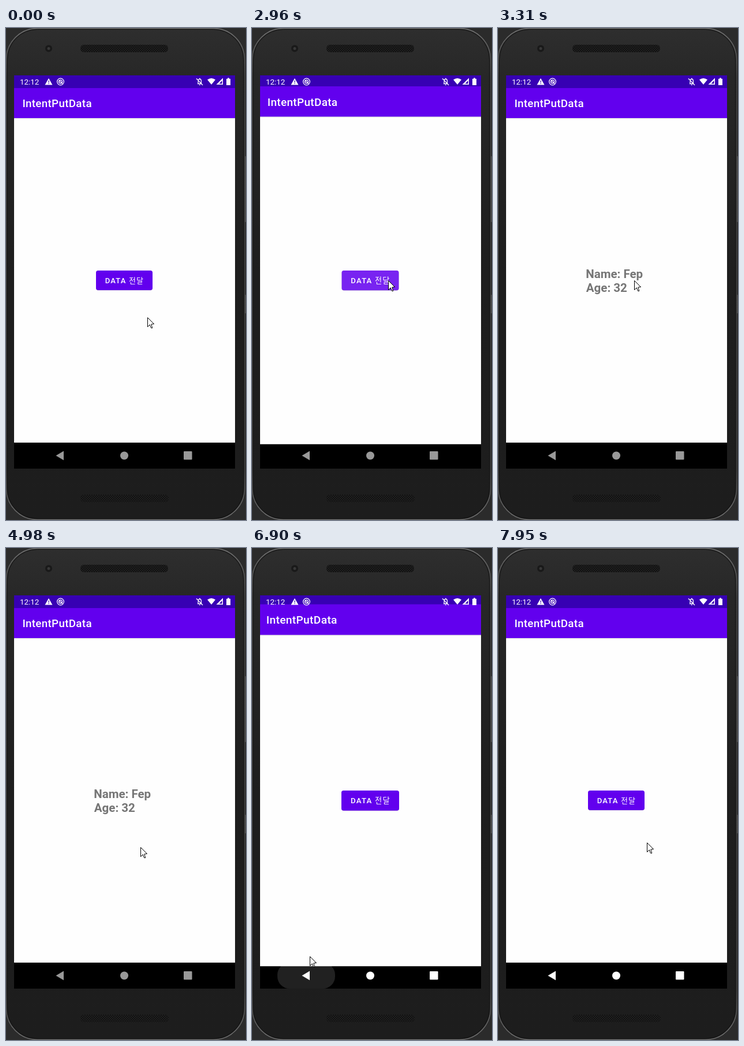
An HTML page for the animation above (8000 ms loop, 416x852 px).

```html
<!DOCTYPE html>
<html lang="ko">
<meta charset="utf-8">
<title>IntentPutData</title>
<style>
  html, body { margin: 0; width: 100%; height: 100%; overflow: hidden; background: #2b2b2b; }
  svg { display: block; width: 416px; height: 852px; font-family: Roboto, "Noto Sans CJK KR", sans-serif; }
  .title { font-size: 18.8px; font-weight: 500; letter-spacing: .32px; }
  .label { font-size: 13.05px; font-weight: 500; letter-spacing: 1.165px; }
  .label tspan { font-weight: 400; }
  .info { font-size: 20.5px; font-weight: 700; fill: #757575; }
</style>
<svg viewBox="0 0 416 852">
  <defs>
    <linearGradient id="shell" x2="0" y2="1">
      <stop stop-color="#2e2e2e"/><stop offset=".1" stop-color="#272727"/>
      <stop offset=".5" stop-color="#1e1e1e"/><stop offset="1" stop-color="#1d1d1d"/>
    </linearGradient>
    <linearGradient id="rim" x2="0" y2="1">
      <stop stop-color="#777"/><stop offset=".1" stop-color="#404040"/>
      <stop offset=".9" stop-color="#404040"/><stop offset="1" stop-color="#777"/>
    </linearGradient>
    <linearGradient id="shade" x2="0" y2="1">
      <stop stop-opacity=".15"/><stop offset="1" stop-opacity="0"/>
    </linearGradient>
    <pattern id="mesh" width="4" height="4" patternUnits="userSpaceOnUse">
      <rect width="4" height="4" fill="#202020"/>
      <circle cx="1" cy="1" r="1" fill="#0b0b0b"/><circle cx="3" cy="3" r="1" fill="#0b0b0b"/>
    </pattern>
    <clipPath id="screen"><path d="M14 82H397V763H14z"/></clipPath>
    <g id="window">
      <path fill="#fefefe" d="M14 82H397V763H14z"/>
      <path fill="#6200ee" d="M14 82H397V156H14z"/>
      <path fill="#3700b3" d="M14 82H397V104H14z"/>
      <path fill="url(#shade)" d="M14 156H397V158H14z"/>
      <path d="M14 718H397V763H14z"/>
      <text class="title" x="28.4" y="137.3" fill="#fff">IntentPutData</text>
    </g>
  </defs>

  <!-- device -->
  <path fill="#4a4a4a" d="M414 222h2v114h-2zM414 462h2v32h-2z"/>
  <rect x=".5" y=".5" width="413" height="851" rx="54" fill="url(#shell)" stroke="url(#rim)" stroke-width="1.5"/>
  <rect x="2.5" y="2.5" width="409" height="847" rx="52" fill="none" stroke="#151515"/>
  <rect x="129" y="29" width="152" height="13" rx="6" fill="url(#mesh)"/>
  <rect x="129" y="808" width="153" height="13" rx="6" fill="url(#mesh)"/>
  <circle cx="74" cy="35.5" r="6" fill="#191919"/>
  <circle cx="74" cy="35.5" r="2.5" fill="#383838"/>

  <g clip-path="url(#screen)">
    <g id="first">
      <use href="#window"/>
      <rect x="156" y="420.5" width="98" height="34" rx="4" opacity=".2"/>
      <rect x="156" y="420" width="98" height="34" rx="3.7" fill="#6200ee"/>
      <rect id="press" x="156" y="420" width="98" height="34" rx="3.7" fill="#fff"/>
      <text class="label" x="171.7" y="441.8" fill="#fff">DATA <tspan>전달</tspan></text>
    </g>
    <g id="second">
      <use href="#window"/>
      <text class="info" x="152.3" y="433">Name: Fep</text>
      <text class="info" x="152.8" y="457">Age: 32</text>
    </g>

    <!-- status bar -->
    <g fill="#fff">
      <text x="24" y="98" font-size="13.4">12:12</text>
      <path d="M74 87l6.5 11.5h-13z"/>
      <path d="M73.5 91h1.2v3.6h-1.2zM73.5 95.6h1.2v1.3h-1.2z" fill="#3700b3"/>
      <path d="M349 89.5q7-5 14 0l-7 8.5z"/>
      <path d="M376 86.5v11.5h-11.5z"/>
      <path d="M374.5 91v5.5h-5z" fill="#3700b3"/>
      <path d="M382 88h2v-1.5h3v1.5h2v11h-7z"/>
    </g>
    <g fill="none" stroke="#fff" stroke-width="1.3">
      <circle cx="94.5" cy="93" r="5.8"/>
      <circle cx="94.5" cy="93" r="2.9"/>
      <path d="M92 90.5l6 6"/>
      <path d="M332 96.5h7.5M333 96v-4q0-3.5 2.7-3.5t2.7 3.5v4M335 87.5h1.5M335 98.5h1.5M330 87.5l11 11.5"/>
    </g>

    <!-- navigation bar -->
    <rect id="ripple" x="44" y="718" width="100" height="45" rx="21" fill="#fff"/>
    <g id="nav">
      <path d="M86.5 740.5l13.5-8v16z"/>
      <circle cx="205" cy="740.5" r="7"/>
      <rect x="308" y="733" width="14.5" height="14.5" rx="1"/>
    </g>
  </g>

  <path id="cursor" d="M.5 .5V16.5L4.2 12.8L6.6 18.5H8.7L6.8 12L11.5 11.5z" fill="#fff" stroke="#000"/>
</svg>
<script>
const LOOP = 8000;
const START = { x: 245, y: 501 };
// each hand movement eases to its end point
const moves = [
  { from: 700, to: 1150, x: 268, y: 543 },
  { from: 1150, to: 1600, x: 302, y: 490 },
  { from: 1720, to: 2490, x: 236, y: 437 },
  { from: 3590, to: 4130, x: 233, y: 512 },
  { from: 4650, to: 4980, x: 233, y: 518 },
  { from: 5600, to: 6400, x: 75, y: 737 },
  { from: 6764, to: 7320, x: 236, y: 543 },
  { from: 7350, to: 7950, x: 258, y: 510 }
];
const $ = id => document.getElementById(id);
const ramp = (t, from, to) => Math.min(1, Math.max(0, (t - from) / (to - from)));
const easeInOut = x => x * x * (3 - 2 * x);
const easeOut = x => 1 - (1 - x) ** 5.4;

function pointer(t) {
  let { x, y } = START;
  for (const move of moves) {
    const p = easeInOut(ramp(t, move.from, move.to));
    x += (move.x - x) * p;
    y += (move.y - y) * p;
  }
  return [Math.round(x), Math.round(y)];
}

function place(id, scale, opacity) {
  $(id).setAttribute("transform", `translate(205.5 422) scale(${scale}) translate(-205.5 -422)`);
  $(id).setAttribute("opacity", opacity);
}

function draw(t) {
  const opening = t < 5000;
  const leave = ramp(t, 6800, 6880);
  const firstScale = opening
    ? 1 + .05 * ramp(t, 2930, 3097)
    : 1.1 - .1 * easeOut(ramp(t, 6800, 7200));
  const secondScale = .93 + .07 * easeOut(ramp(t, 3000, 3300)) - .1 * leave;
  place("first", firstScale, 1);
  place("second", secondScale, ramp(t, 3010, 3070) * (1 - leave));
  $("press").setAttribute("opacity", opening ? .14 * ramp(t, 2650, 2800) : 0);
  $("ripple").setAttribute("opacity", .13 * ramp(t, 6500, 6650) * (1 - ramp(t, 6950, 7300)));
  $("nav").setAttribute("fill", t < 6550 ? "#999" : "#fff");
  $("cursor").setAttribute("transform", `translate(${pointer(t)})`);
}

function tick() {
  draw(performance.now() % LOOP);
  requestAnimationFrame(tick);
}
tick();
</script>
</html>
```
